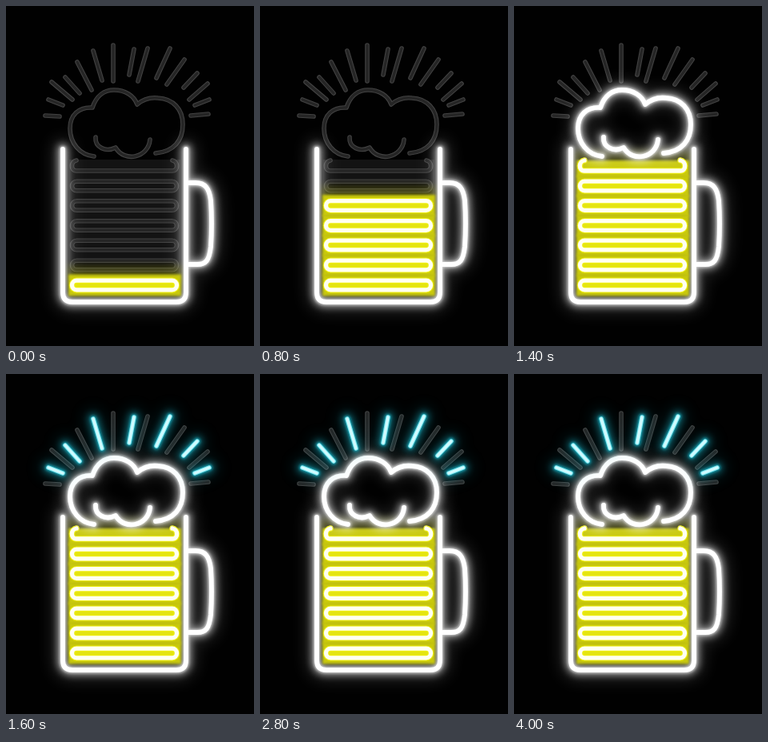
Recreate the animation shown at these times as an HTML page without scripts. Size 310 by 425 pixels, loop 4.6 s.

```html
<!DOCTYPE html>
<html lang="en">
<head>
<meta charset="utf-8">
<title>Neon beer mug</title>
<style>
html, body { margin: 0; width: 100%; height: 100%; overflow: hidden; background: #010101; }
svg { display: block; width: 310px; height: 425px; fill: none; }
svg * { stroke-linecap: round; stroke-linejoin: round; }

/* unlit tubes */
.edge { stroke: #424242; stroke-width: 5.6; }
.dull { stroke: #252525; stroke-width: 3.4; }

/* lit tubes: haze, halo, rim, core */
.haze { stroke: #fff; stroke-width: 28; opacity: .12; filter: blur(9px); }
.halo { stroke: #fff; stroke-width: 14; opacity: .5; filter: blur(4.5px); }
.rim { stroke: #fff; stroke-width: 8; opacity: .6; filter: blur(1.5px); }
.core { stroke: #fff; stroke-width: 5.8; }
.ray .rim { opacity: .85; }
.ray .core { stroke-width: 5.4; }
.ray .hot { stroke-width: 3.3; }
.cyan { stroke: #17a3b5; }
.cyan .core { stroke: #7fe9f2; }
.cyan .hot { stroke: #d0fbff; }
.pink { stroke: #b03a78; }
.pink .core { stroke: #f3a8cb; }
.pink .hot { stroke: #ffeef6; }
.ray .haze, .ray .halo, .ray .rim { stroke: inherit; }

.glow { fill: #cfd000; opacity: .22; filter: blur(5px); }
.beer { fill: #c9c90c; filter: blur(1.8px); }
.gold { stroke: #eeee10; stroke-width: 7.4; fill: #e4e410; }
.pale { stroke: #fffff2; stroke-width: 5.3; }
.open { fill: none; }

.foam { animation: foam 4.6s step-end infinite; }
.cyan { animation: cyan 4.6s step-end infinite; }
.pink { animation: pink 4.6s step-end infinite; }
@keyframes foam { 0% { opacity: 0 } 30.43%, 100% { opacity: 1 } }
@keyframes cyan {
  0%, 47.82%, 73.91% { opacity: 0 }
  34.78%, 60.86%, 86.95%, 100% { opacity: 1 }
}
@keyframes pink {
  0%, 60.86%, 86.95%, 100% { opacity: 0 }
  47.82%, 73.91% { opacity: 1 }
}
</style>
</head>
<body>
<svg viewBox="0 0 310 425">
  <defs>
    <path id="mug" d="M71 179V358Q71 370 83 370H213Q225 370 225 358V179M229 221H237C249 221 254 228 256 243Q258 272 256 301C254 318 250 323 239 323H229"/>
    <path id="cloud" d="M110 188C92 186 80 171 80 153C80 136 91 126 108 127C113 112 123 105 135 105C149 105 160 112 164 123C172 116 181 114 190 115C209 116 221 129 221 148C221 168 210 182 187 184M112 164C111 177 125 183 137 177C148 196 178 190 180 167"/>
    <path id="blue" d="M53 117L71 124M74 89L92 109M109 56L120 93M160 54L154 86M205 53L188 90M239 84L222 102M254 117L236 124"/>
    <path id="rose" d="M49 137L67 138M57 95L83 117M89 70L107 105M134 49V94M177 53L165 94M223 67L201 98M252 97L229 117M253 135L231 137"/>
    <rect id="loop" x="82.5" y="-5.8" width="131" height="11.6" rx="5.8"/>
    <path id="hook" d="M88 193C81 194 80 206 88 206H208C216 206 215 194 208 193"/>
    <g id="unlit"><use href="#loop" class="edge"/><use href="#loop" class="dull"/></g>
    <g id="lit">
      <rect class="glow" x="76" y="-24" width="145" height="24"/>
      <rect class="beer" x="78" y="-13.5" width="141" height="27"/>
      <use href="#loop" class="gold"/><use href="#loop" class="pale"/>
    </g>
  </defs>

  <!-- unlit sign -->
  <rect x="79" y="192" width="139" height="166" fill="#131313"/>
  <g class="edge"><use href="#cloud"/><use href="#blue"/><use href="#rose"/><use href="#hook"/></g>
  <g class="dull"><use href="#cloud"/><use href="#blue"/><use href="#rose"/><use href="#hook"/></g>
  <use href="#unlit" y="324"/>
  <use href="#unlit" y="299"/>
  <use href="#unlit" y="274.5"/>
  <use href="#unlit" y="249.5"/>
  <use href="#unlit" y="225"/>

  <use href="#mug" class="haze"/>
  <use href="#mug" class="halo"/>

  <!-- beer rises one tube every 200 ms -->
  <use href="#lit" y="349"/>
  <use href="#lit" y="324"><animate attributeName="opacity" values="0;1" keyTimes="0;.0434" calcMode="discrete" dur="4.6s" repeatCount="indefinite"/></use>
  <use href="#lit" y="299"><animate attributeName="opacity" values="0;1" keyTimes="0;.0869" calcMode="discrete" dur="4.6s" repeatCount="indefinite"/></use>
  <use href="#lit" y="274.5"><animate attributeName="opacity" values="0;1" keyTimes="0;.1304" calcMode="discrete" dur="4.6s" repeatCount="indefinite"/></use>
  <use href="#lit" y="249.5"><animate attributeName="opacity" values="0;1" keyTimes="0;.1739" calcMode="discrete" dur="4.6s" repeatCount="indefinite"/></use>
  <use href="#lit" y="225"><animate attributeName="opacity" values="0;1" keyTimes="0;.2173" calcMode="discrete" dur="4.6s" repeatCount="indefinite"/></use>
  <g>
    <animate attributeName="opacity" values="0;1" keyTimes="0;.2608" calcMode="discrete" dur="4.6s" repeatCount="indefinite"/>
    <rect class="glow" x="76" y="180" width="145" height="24"/>
    <rect class="beer" x="78" y="193" width="141" height="21"/>
    <use href="#hook" class="gold open"/><use href="#hook" class="pale"/>
  </g>

  <use href="#mug" class="rim"/>
  <use href="#mug" class="core"/>

  <g class="foam">
    <use href="#cloud" class="haze"/><use href="#cloud" class="halo"/>
    <use href="#cloud" class="rim"/><use href="#cloud" class="core"/>
  </g>
  <g class="ray cyan">
    <use href="#blue" class="haze"/><use href="#blue" class="halo"/><use href="#blue" class="rim"/>
    <use href="#blue" class="core"/><use href="#blue" class="hot"/>
  </g>
  <g class="ray pink">
    <use href="#rose" class="haze"/><use href="#rose" class="halo"/><use href="#rose" class="rim"/>
    <use href="#rose" class="core"/><use href="#rose" class="hot"/>
  </g>
</svg>
</body>
</html>
```
